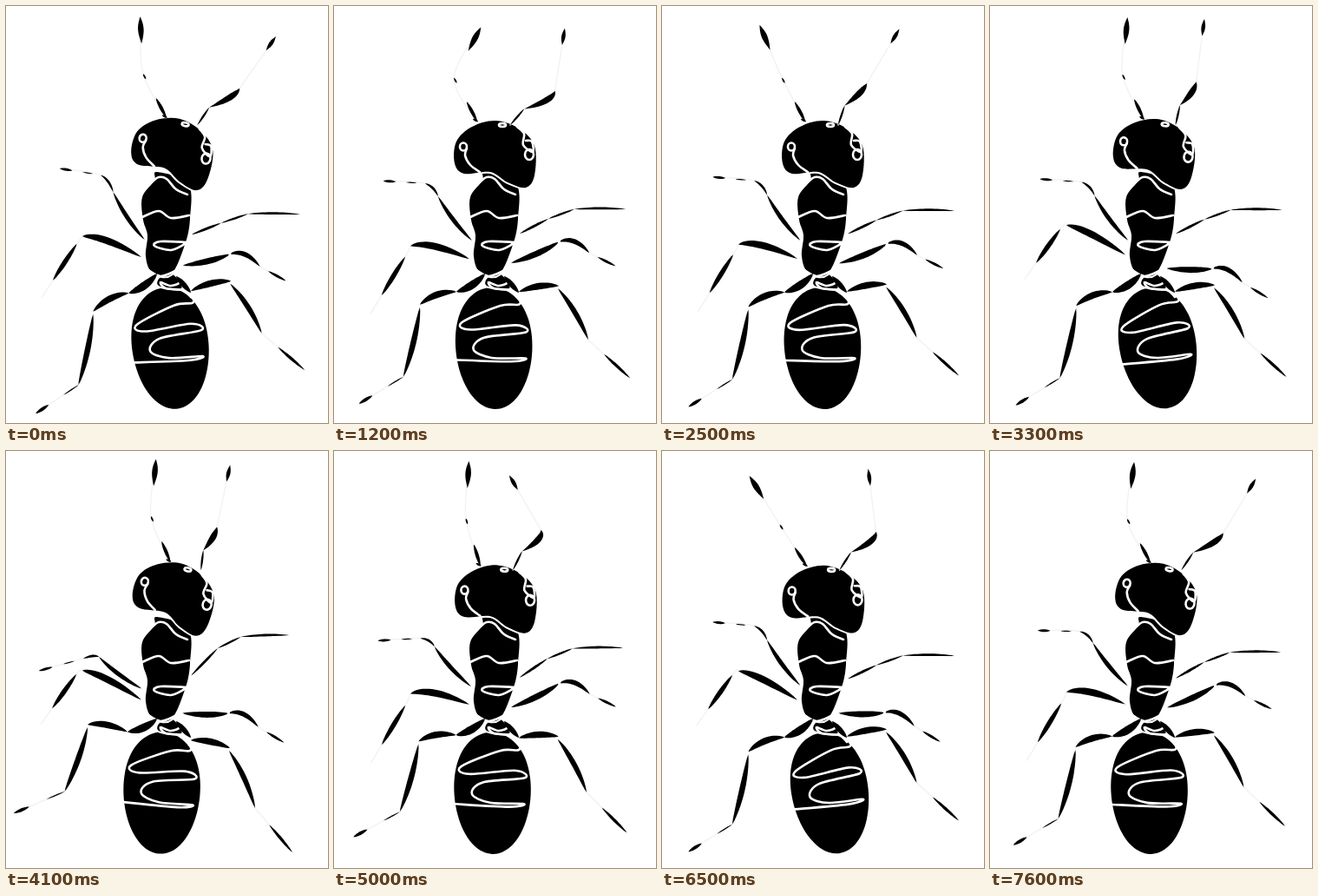
An HTML page with a canvas that plays this animation: 371 px wide and 480 px high, repeating every 7700 ms.

```html
<!DOCTYPE html>
<html lang="en">
<head>
<meta charset="utf-8">
<title>Ant</title>
<style>
html, body { margin: 0; width: 100%; height: 100%; overflow: hidden; background: #fff; }
canvas { display: block; width: 371px; height: 480px; }
</style>
</head>
<body>
<canvas id="stage"></canvas>
<script>
const W = 371, H = 480, LOOP = 7700, STEP = 100, GAITS = 12;
const RAD = Math.PI / 180;
const canvas = document.getElementById('stage');
const ctx = canvas.getContext('2d');
const ratio = window.devicePixelRatio || 1;
canvas.width = W * ratio;
canvas.height = H * ratio;

const lerp = (a, b, k) => a + (b - a) * k;
const mix = (p, q, k) => [lerp(p[0], q[0], k), lerp(p[1], q[1], k)];
const off = (p, x, y) => [p[0] + x, p[1] + y];
const mid = (p, q, x = 0, y = 0) => off(mix(p, q, .5), x, y);
// Point at a distance from p, angle measured clockwise from straight up
const reach = (p, deg, len) => off(p, Math.sin(deg * RAD) * len, -Math.cos(deg * RAD) * len);

// time, head turn, then lower and upper angle of the left and right antenna
const poses = [
  [0, 11, -28, -3, 51, 35],
  [1200, 0, -28, 28, 58, 9],
  [2500, 0, -28, -23, 35, 31],
  [4100, 13.5, -23, 5, 22, 12],
  [5000, 2, -17, 3, 43, -30],
  [6500, 1, -33, -32, 50, -7],
  [7600, 11, -28, 7, 51, 31]
];

// Hip, knee, ankle and tip at rest, then how far knee and tip swing
const legs = {
  frontL: [[159, 270], [120, 219], [105, 204], [57, 201], [-13, 18], [-19, 52]],
  midL: [[156, 291], [88, 275], [82, 287], [42, 352], [0, -24], [-2, -40]],
  hindL: [[141, 329], [99, 344], [80, 427], [29, 458], [-5, -29], [-20, -41]],
  frontR: [[214, 262], [247, 245], [277, 234], [336, 234], [-3, -18], [-10, -22]],
  midR: [[204, 296], [259, 273], [294, 286], [324, 301], [-3, 31], [-4, 37]],
  hindR: [[213, 329], [259, 322], [293, 384], [341, 428], [-1, 20], [-11, 34]]
};

function joints(name, k) {
  const [hip, knee, ankle, tip, dKnee, dTip] = legs[name];
  const move = (p, d, w = 1) => off(p, d[0] * k * w, d[1] * k * w);
  return [move(hip, dKnee, .2), move(knee, dKnee), move(ankle, mid(dKnee, dTip)), move(tip, dTip)];
}

// Closed or open smooth path through points
function trace(pts, closed) {
  const n = pts.length;
  const at = i => closed ? pts[(i + n) % n] : pts[Math.max(0, Math.min(n - 1, i))];
  ctx.beginPath();
  ctx.moveTo(...pts[0]);
  for (let i = 0; i < (closed ? n : n - 1); i++) {
    const [a, b, c, d] = [at(i - 1), at(i), at(i + 1), at(i + 2)];
    ctx.bezierCurveTo(b[0] + (c[0] - a[0]) / 6, b[1] + (c[1] - a[1]) / 6,
      c[0] - (d[0] - b[0]) / 6, c[1] - (d[1] - b[1]) / 6, c[0], c[1]);
  }
}

function pen(width, color = '#fff') {
  ctx.strokeStyle = color;
  ctx.lineWidth = width;
  ctx.stroke();
}

function blob(pts) {
  trace(pts, true);
  pen(4);
  ctx.fillStyle = '#000';
  ctx.fill();
}

function line(...pts) {
  trace(pts, false);
  pen(2.6);
}

function faint(...pts) {
  trace(pts, false);
  pen(1.5, '#f3f3f3');
}

function ring(x, y, rx, ry) {
  ctx.beginPath();
  ctx.ellipse(x, y, rx, ry, 0, 0, 7);
  pen(2.6);
}

// Tapered stroke from a to b bent towards c; a lower power gives blunter ends
function blade(a, b, width, c = mid(a, b), power = .7) {
  const left = [], right = [], n = 18;
  for (let i = 0; i <= n; i++) {
    const s = i / n;
    const p = mix(mix(a, c, s), mix(c, b, s), s);
    const [dx, dy] = mix(off(c, -a[0], -a[1]), off(b, -c[0], -c[1]), s);
    const w = width / 2 * Math.abs(Math.sin(Math.PI * s)) ** power / (Math.hypot(dx, dy) || 1);
    left.push([p[0] - dy * w, p[1] + dx * w]);
    right.unshift([p[0] + dy * w, p[1] - dx * w]);
  }
  ctx.beginPath();
  left.concat(right).forEach(p => ctx.lineTo(...p));
  ctx.fillStyle = '#000';
  ctx.fill();
}

function turned(x, y, deg, draw) {
  ctx.save();
  ctx.translate(x, y);
  ctx.rotate(deg * RAD);
  ctx.translate(-x, -y);
  draw();
  ctx.restore();
}

function abdomen() {
  const egg = [];
  for (let a = 0; a < 360; a += 15) {
    const s = Math.sin(a * RAD), c = Math.cos(a * RAD);
    egg.push([183 + 5 * (1 - c) / 2 + 46 * s * (1 - .04 * s * s + .07 * c), 394 - 70 * c]);
  }
  blob(egg);
  line([213, 333], [214, 343], [192, 345], [148, 365], [158, 373], [210, 367], [222, 375],
    [174, 382], [162, 396], [183, 405], [222, 405], [205, 409], [138, 408]);
}

function thorax() {
  blob([[178, 312], [192, 309], [202, 325], [176, 322]]);
  line([196, 305], [201, 317], [190, 322], [178, 318], [184, 325], [204, 327], [213, 335]);
  blade([196, 311], [213, 330], 6);
  blob([[174, 191], [171, 201], [157, 220], [158, 246], [163, 264], [161, 288], [168, 306], [190, 309],
    [206, 275], [212, 245], [210, 205]]);
  line([157, 243], [176, 236], [190, 244], [211, 241]);
  line([209, 272], [178, 271], [171, 276], [190, 281], [206, 274]);
  line([161, 302], [178, 311], [197, 304]);
}

function head() {
  blob([[159, 139], [186, 132], [213, 141], [231, 161], [231, 195], [221, 209], [200, 203], [180, 191],
    [150, 193], [139, 181], [141, 156]]);
  ring(149, 162, 4, 4.5);
  line([153, 164], [151, 172], [157, 183], [168, 191]);
  ring(225, 171, 5, 6);
  line([211, 139], [219, 147], [218, 160], [229, 168], [228, 156], [221, 155]);
  ring(194, 137, 4, 2);
}

function drawLegs(u, v) {
  let [a, b, c, d] = joints('frontL', u);
  faint(b, c, d);
  blade(a, b, 5, mid(a, b, -4, 3));
  blade(b, c, 2.8, mid(b, c, 3, -4));
  blade(mix(c, d, .2), mix(c, d, .45), 1.3);
  blade(d, mix(d, c, .3), 3);

  [a, b, c, d] = joints('midL', v);
  faint(b, c, d);
  blade(a, b, 8, mid(a, b, -12, -14));
  blade(c, mix(c, d, .68), 5.5, mix(c, d, .35));

  [a, b, c, d] = joints('hindL', u);
  blade([174, 308], a, 9, mid([174, 308], a, 2, 6));
  faint(c, d);
  blade(a, b, 7.5, mid(a, b, -3, -8));
  blade(off(b, 0, 3), c, 6.5, mid(b, c, 4, 3));
  blade(c, mix(c, d, .35), 1.4);
  blade(d, mix(d, c, .3), 3.8);

  [a, b, c, d] = joints('frontR', u);
  faint(b, c, d);
  blade(a, b, 3);
  blade(b, c, 2.4);
  blade(c, d, 2.8, mid(c, d, 0, -2));

  [a, b, c, d] = joints('midR', v);
  faint(c, d);
  blade(a, b, 7, mid(a, b, 4, 3));
  blade(b, c, 5.5, mid(b, c, 0, -14));
  line(off(b, -1, 7), off(b, 1, -4));
  blade(d, mix(d, c, .68), 3);

  [a, b, c, d] = joints('hindR', u);
  faint(c, d);
  blade(a, b, 7.5, mid(a, b, 0, -6));
  blade(off(b, -1, 3), c, 6, mid(b, c, 4, -2));
  blade(d, mix(d, c, .62), 3.4);
}

function leftAntenna(base, low, up) {
  const elbow = reach(base, low, 57), tip = reach(elbow, up, 66);
  faint(base, elbow, tip);
  blade(base, mix(base, elbow, .45), 4);
  blade(off(base, 1, 0), off(base, -5, -3), 2.5);
  blade(elbow, mix(elbow, base, .12), 2);
  blade(tip, mix(tip, elbow, .47), 6.5, mix(tip, elbow, .2), 1);
}

function rightAntenna(base, low, up) {
  // the lower half looks shorter when it points ahead
  const elbow = reach(base, low, 36 + .4 * low), tip = reach(elbow, up, 81);
  const start = off(mix(base, elbow, .4), -4, -6);
  faint(base, start);
  faint(elbow, tip);
  blade(base, start, 2.4);
  blade(start, mix(elbow, tip, .1), 7, off(elbow, 0, 3), .9);
  blade(tip, mix(tip, elbow, .24), 4.5, undefined, 1);
}

function render(t) {
  const i = poses.findLastIndex(p => p[0] <= t);
  const a = poses[i], b = poses[(i + 1) % poses.length];
  const span = (b[0] || LOOP) - a[0], s = (t - a[0]) / span;
  const ease = (1 - Math.cos(Math.PI * s)) / 2;
  const waggle = 14 * Math.sin(Math.PI * Math.round(span / 320) * s);
  const [, turn, lowL, upL, lowR, upR] = a.map((x, j) => lerp(x, b[j], ease));

  const gait = t / LOOP * GAITS * 360;
  const wave = (deg, n = 1) => Math.cos((gait - deg) * n * RAD);
  const outer = .47 - .74 * wave(4.5), middle = .47 + .66 * wave(95);
  const tail = 1 - 6 * wave(30) + 1.8 * wave(155, 2);

  ctx.setTransform(ratio, 0, 0, ratio, 0, 0);
  ctx.fillStyle = '#fff';
  ctx.fillRect(0, 0, W, H);
  ctx.lineCap = ctx.lineJoin = 'round';
  turned(188, 318, tail, abdomen);
  thorax();
  drawLegs(outer, middle);
  turned(204, 202, turn, head);
  line([169, 202], [176, 197], [185, 199], [196, 211], [209, 217]);
  leftAntenna([165 + 1.8 * turn, 133 - .4 * turn], lowL, upL + waggle);
  rightAntenna([203 + 1.6 * turn, 137], lowR, upR - waggle);
}

const begin = performance.now();
function tick() {
  const t = (performance.now() - begin) % LOOP;
  render(Math.floor(t / STEP) * STEP);
  requestAnimationFrame(tick);
}
tick();
</script>
</body>
</html>
```
